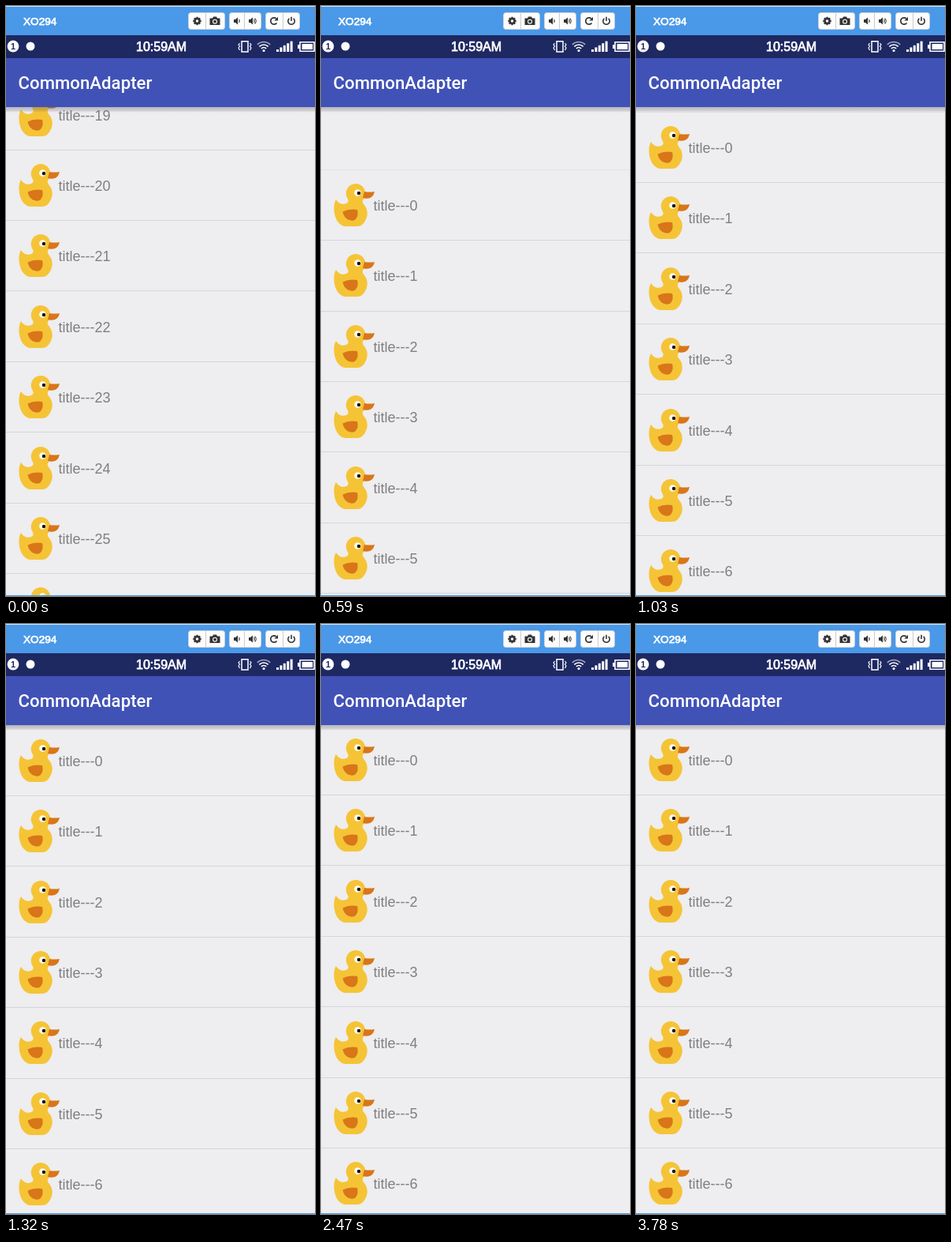
Recreate the animation shown at these times as an HTML page with a canvas. Size 392 px wide and 747 px high, loop 3.88 s.

```html
<!DOCTYPE html>
<html lang="en">
<head>
<meta charset="utf-8">
<title>CommonAdapter list</title>
<style>
  html, body { margin: 0; width: 100%; height: 100%; overflow: hidden; background: #eeedef; }
  canvas { display: block; width: 392px; height: 747px; }
</style>
</head>
<body>
<canvas id="stage"></canvas>
<script>
const W = 392, H = 747, LOOP = 3880, ROW = 89.4, LIST_TOP = 128;
const SANS = '"Liberation Sans", Arial, sans-serif';
const canvas = document.getElementById('stage');
const ctx = canvas.getContext('2d');
const ratio = window.devicePixelRatio || 1;
canvas.width = W * ratio;
canvas.height = H * ratio;

// Fling to the top, overscroll and settle: [time, centre of the first row]
const scroll = [
  [0, -1560.1], [150, -870], [300, -284.1], [440, 171], [590, 253], [740, 213.9],
  [880, 190], [1030, 179.9], [1170, 175.4], [1320, 173.8], [1460, 173.2], [1610, 172.9]
];
// Pointer passing along the lower edge: [time, x, y]
const pointer = [[0], [2620, 230, 735], [2770, 267, 739], [2920, 286, 742], [3060]];

const stepAt = (steps, t) => steps.filter(s => s[0] <= t).pop();

function rect(x, y, w, h, color) {
  ctx.fillStyle = color;
  ctx.fillRect(x, y, w, h);
}

function disc(x, y, r, color) {
  ctx.fillStyle = color;
  ctx.beginPath();
  ctx.arc(x, y, r, 0, 7);
  ctx.fill();
}

function shape(d, color) {
  ctx.fillStyle = color;
  ctx.fill(new Path2D(d));
}

function line(d, color, width) {
  ctx.strokeStyle = color;
  ctx.lineWidth = width;
  ctx.stroke(new Path2D(d));
}

function label(text, x, y, font, color, weight = 0, kerning = 'none') {
  ctx.font = font;
  ctx.fontKerning = kerning;
  ctx.fillStyle = color;
  ctx.fillText(text, x, y);
  if (weight) {
    ctx.strokeStyle = color;
    ctx.lineWidth = weight;
    ctx.strokeText(text, x, y);
  }
}

function at(x, y, draw) {
  ctx.save();
  ctx.translate(x, y);
  draw();
  ctx.restore();
}

function duck() {
  const yellow = '#f5c436', orange = '#d87619';
  shape('M19 -8C22 -3 27 -1 32 -3Q36 -5 34 -9L54 -9Q51 -5 55 -1C59 4 60 11 57 17' +
        'Q53 26 46 26H31C21 25 16 13 16.5 1Q17 -5 19 -8Z', yellow);
  disc(44, -15.8, 12.2, yellow);
  shape('M55 -18Q62 -17 68 -18Q66 -10 60 -9.5Q56 -9 53 -10Z', orange);
  shape('M27.5 7.5Q36 3 46 5Q48 12 44 17Q41 20 36 18Q29 16 27.5 7.5Z', orange);
  disc(46.5, -16.5, 4.3, '#fffdf4');
  disc(48, -16, 2.3, '#1c1710');
}

function list(first) {
  rect(0, LIST_TOP, W, H - LIST_TOP, '#eeedef');
  const divider = (y, color) => rect(0, Math.floor(y), W, 1, color);
  divider(first - 45.8, '#e3e1e3');
  const start = Math.max(0, Math.floor((LIST_TOP - first) / ROW) - 1);
  for (let i = start; first + i * ROW < H + 40; i++) {
    const y = first + i * ROW;
    at(0, Math.round(y), duck);
    label('title---' + i, 66.5, Math.round(y) + 6, '18px ' + SANS, '#7f7f81');
    divider(y + 43.6, '#d6d5d7');
  }
  const shadow = ctx.createLinearGradient(0, LIST_TOP, 0, LIST_TOP + 7);
  shadow.addColorStop(0, 'rgba(80,80,85,.34)');
  shadow.addColorStop(.6, 'rgba(90,90,95,.22)');
  shadow.addColorStop(1, 'rgba(120,120,125,0)');
  rect(0, LIST_TOP, W, 7, shadow);
}

const INK = '#333';

function gear() {
  for (let i = 0; i < 8; i++) {
    ctx.save();
    ctx.rotate(i * Math.PI / 4);
    rect(-1.2, -5.2, 2.4, 3, INK);
    ctx.restore();
  }
  disc(0, 0, 4, INK);
  disc(0, 0, 1.7, '#fff');
}

function camera() {
  shape('M-6.5 -3.5H-3L-2 -5.5H2L3 -3.5H6.5V5H-6.5Z', INK);
  disc(0, .7, 3, '#fff');
  disc(0, .7, 1.9, INK);
}

function speaker(waves) {
  shape('M-4 -2H-2L1 -4.5V4.5L-2 2H-4Z', INK);
  for (let i = 0; i < waves; i++) {
    ctx.beginPath();
    ctx.arc(1, 0, 2.2 + i * 2, -.9, .9);
    ctx.strokeStyle = INK;
    ctx.lineWidth = 1.1;
    ctx.stroke();
  }
}

function refresh() {
  line('M3.4 2.4A4.2 4.2 0 1 1 2.8 -3.1', INK, 1.7);
  shape('M5 -5.2V-.6H.4Z', INK);
}

function power() {
  line('M-2.6 -3.2A4.2 4.2 0 1 0 2.6 -3.2M0 -5.2V0', INK, 1.6);
}

function buttonPair(x, w, split) {
  ctx.beginPath();
  ctx.roundRect(x + .5, 8.5, w - 1, 21, 3);
  ctx.fillStyle = '#fcfcfc';
  ctx.fill();
  ctx.strokeStyle = '#c9d2dc';
  ctx.lineWidth = 1;
  ctx.stroke();
  rect(split, 9, 1, 20, '#cccccc');
}

function windowBar() {
  rect(0, 0, W, 37, '#4a98e8');
  rect(0, 0, W, 1, '#d3e4f7');
  label('XO294', 22, 24, '13.6px ' + SANS, '#fff', .75);
  buttonPair(231, 47, 253);
  buttonPair(283, 41, 302);
  buttonPair(329, 44, 351);
  at(242.5, 19, gear);
  at(265, 19, camera);
  at(293, 19, () => speaker(1));
  at(312, 19, () => speaker(2));
  at(340, 19, refresh);
  at(362, 19, power);
}

function wifi() {
  ctx.lineWidth = 1.7;
  for (const [r, color] of [[4.5, '#fff'], [8, '#fff'], [11.5, '#a5a9c0']]) {
    ctx.strokeStyle = color;
    ctx.beginPath();
    ctx.arc(327, 57, r, -Math.PI * .75, -Math.PI * .25);
    ctx.stroke();
  }
  disc(327, 56.5, 1.6, '#fff');
}

function statusBar() {
  rect(0, 37, W, 29, '#1e2861');
  disc(9, 51, 7.4, '#fff');
  label('1', 6, 55, 'bold 11px ' + SANS, '#1e2861');
  disc(31, 51, 5.5, '#fff');
  label('10:59AM', 165, 57, '16px ' + SANS, '#fff', .75);
  line('M299 44.8H307V58H299Z', '#fff', 1.5);
  line('M296.5 47L295 49L296.5 51L295 53L296.5 56M309.5 47L311 49L309.5 51L311 53L309.5 56', '#fff', 1.2);
  wifi();
  for (let i = 0; i < 5; i++) {
    const h = 3 + i * 2.6;
    rect(343 + i * 4.4, 58 - h, 3, h, '#fff');
  }
  line('M373 45.8H391V57.2H373Z', '#fff', 1.6);
  rect(370, 49, 3, 5, '#fff');
  rect(375.5, 48, 13.5, 7, '#fff');
}

function appBar() {
  rect(0, 66, W, 62, '#4152b7');
  label('CommonAdapter', 15.6, 105, '500 22.2px Roboto, sans-serif', '#fff', 0, 'auto');
}

function arrow() {
  const d = 'M0 0V12L3 9.5L5 14L7 13L5 9H8Z';
  line(d, '#fff', 1.5);
  shape(d, '#111');
}

function render(now) {
  const t = now % LOOP;
  ctx.setTransform(ratio, 0, 0, ratio, 0, 0);
  list(stepAt(scroll, t)[1]);
  windowBar();
  statusBar();
  appBar();
  rect(0, H - 1, W, 1, '#4a98e8');
  const [, x, y] = stepAt(pointer, t);
  if (x) at(x, y, arrow);
}

const began = performance.now();
function tick() {
  render(performance.now() - began);
  requestAnimationFrame(tick);
}
tick();
</script>
</body>
</html>
```
